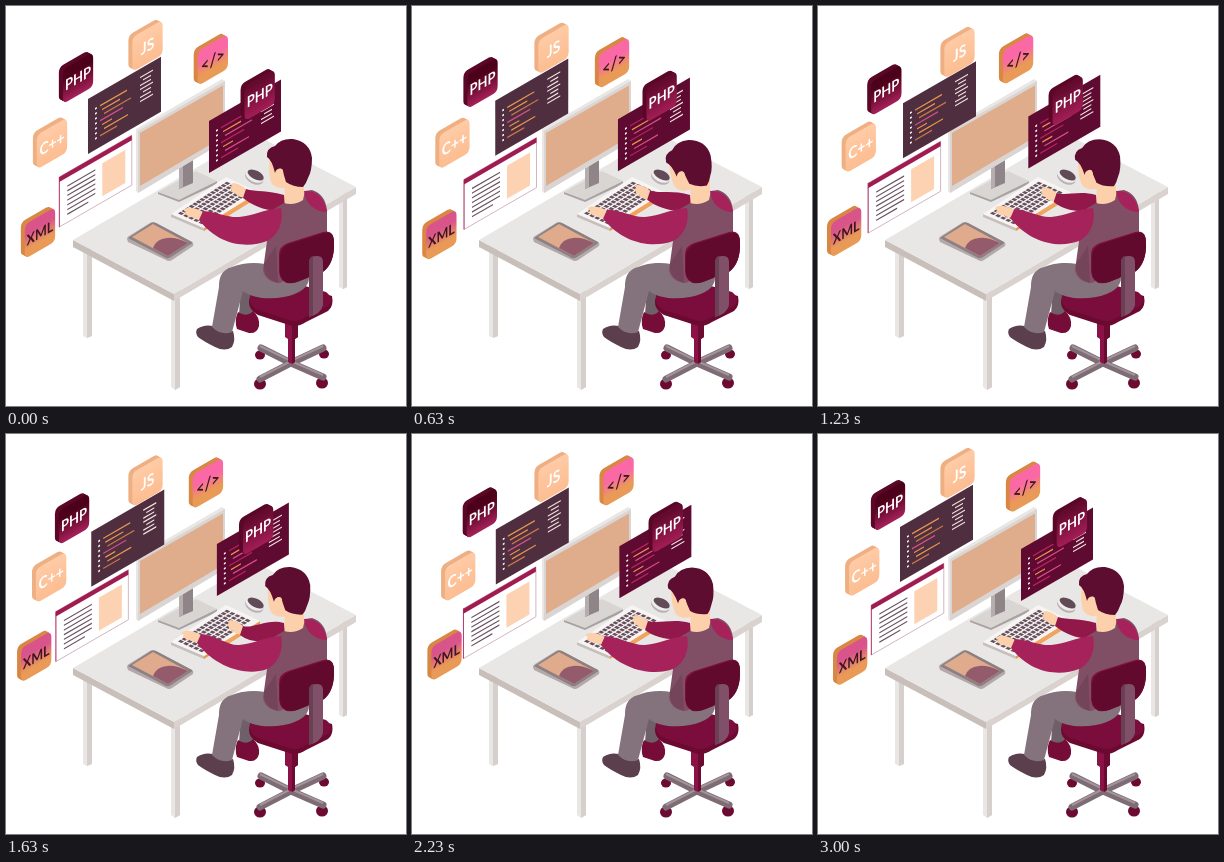
Recreate the animation shown at these times as an HTML page. Size 400 by 400 pixels, loop 3.03 s.

```html
<!DOCTYPE html>
<html lang="en">
<head>
<meta charset="utf-8">
<title>Developer at a desk</title>
<style>
html, body { margin: 0; width: 100%; height: 100%; overflow: hidden; background: #fff; }
svg { display: block; width: 100vw; height: 100vh; }
text { font-family: Lato, "Open Sans", sans-serif; font-weight: 700; text-anchor: middle; }
</style>
</head>
<body>
<svg id="stage" viewBox="0 0 400 400">
  <defs>
    <linearGradient id="wine" x2="0" y2="1"><stop offset=".25" stop-color="#4d0019"/><stop offset="1" stop-color="#a6215a"/></linearGradient>
    <linearGradient id="berry" x2="0" y2="1"><stop offset=".1" stop-color="#640a2f"/><stop offset="1" stop-color="#a31d55"/></linearGradient>
    <linearGradient id="sunset" x2="0" y2="1"><stop offset=".3" stop-color="#d9548b"/><stop offset=".75" stop-color="#e99a56"/></linearGradient>
    <linearGradient id="candy" x2="0" y2="1"><stop offset=".35" stop-color="#fb68a6"/><stop offset=".75" stop-color="#e99a56"/></linearGradient>
    <linearGradient id="peach" x2="0" y2="1"><stop offset="0" stop-color="#ffcba6"/><stop offset="1" stop-color="#fcbd91"/></linearGradient>
  </defs>

  <g id="desk">
    <path fill="#e9e7e6" d="M333 185h8v96l-4 2-4-2zM77 236h9v94l-5 2-4-2zM165 284h9v97l-5 3-4-3z"/>
    <path fill="#d6cfcb" d="M337 185h4v96l-4 2zM81 236h5v94l-5 2zM169 284h5v97l-5 3z"/>
    <path fill="#c9bfba" d="M67 234L168 288V295L67 241Z"/>
    <path fill="#d9d2ce" d="M168 288L350 181V188L168 295Z"/>
    <path fill="#e8e7e5" d="M67 234L248 128L350 181L168 288Z"/>
  </g>

  <g id="monitor">
    <path fill="#aaa2a2" d="M152 186L173 193L211 175V178L173 196L152 188Z"/>
    <path fill="#d9d5d3" d="M152 186L190 165L211 175L173 194Z"/>
    <path fill="#8f8588" d="M173 155l14-8v30l-14 6z"/>
    <path fill="#b5adae" d="M173 155l4-2v28l-4 2z"/>
    <path fill="#e9e6e4" d="M130 123L216 73L219 75V135L132 187L130 185Z"/>
    <path fill="#dad5d2" d="M132 125L219 75V135L132 187Z"/>
    <path fill="#dfac8c" d="M134 127L217 79.500V131L134 180Z"/>
  </g>

  <g id="tablet">
    <path fill="#b3a8aa" d="M121 233q0-2 2-3L144 217q3-2 6 0L186 236q2 1 1 4L166 254q-3 2-6 0L122 236z"/>
    <path fill="#8d8083" d="M122 232L145 217q2-1 5 0L186 236q1 1-1 2L165 251q-3 2-5 1z"/>
    <path fill="#dfab8c" d="M126 231L147 218L182 237L162 250Z"/>
    <path fill="#945b6d" d="M147 242Q150 233 161 232Q170 231 182 237L162 250Z"/>
  </g>

  <g id="keyboard">
    <path fill="#c7bfbc" d="M165 208L198 222V225L165 211Z"/>
    <path fill="#e8994f" d="M198 222L254 187V190L198 225Z"/>
    <path fill="#f7f5f4" d="M165 208L220 171L254 187L198 222Z"/>
    <g id="keys" fill="#68505d"></g>
    <path fill="#f0a45f" d="M203 217L240 194L244 196L207 219Z"/>
  </g>

  <g id="mouse" transform="rotate(27 248 170)">
    <ellipse cx="249" cy="171.500" rx="9.800" ry="6" fill="#b9b1b3"/>
    <ellipse cx="248.500" cy="169.800" rx="9.800" ry="5.700" fill="#efecec"/>
    <ellipse cx="249" cy="168.300" rx="8.800" ry="4.300" fill="#604b57"/>
  </g>

  <g id="windows"></g>
  <g id="tiles"></g>

  <g id="chair-base">
    <g fill="#6d0a32">
      <ellipse cx="254" cy="378" rx="6" ry="5.500"/><ellipse cx="316" cy="377" rx="6" ry="5.500"/>
      <ellipse cx="254" cy="349" rx="5" ry="4.500"/><ellipse cx="318" cy="348" rx="5" ry="4.500"/>
    </g>
    <g stroke="#7e6c75" stroke-width="7" stroke-linecap="round">
      <path d="M285 357L255 342M285 357L317 342M285 357L254 373M285 357L317 371"/>
    </g>
    <path stroke="#a3939b" stroke-width="2" fill="none" d="M254 340L285 355L317 340M254 371L285 355L317 369"/>
    <path fill="#8a1246" d="M279 314h13v17l-3 2v23q-3 3-7 0v-23l-3-2z"/>
    <path fill="#6d0a32" d="M286 314h6v17l-3 2v23l-3 2z"/>
  </g>

  <g id="lower-body">
    <path fill="#6f5f68" d="M235 280L233 309Q240 315 246 311L254 288Z"/>
    <path fill="#760d39" d="M232 306Q241 312 247 305Q254 311 253 320Q251 328 243 327L231 323Q228 314 232 306Z"/>
    <path fill="#6b0931" d="M244 291Q240 302 252 309L283 319Q291 322 300 316L322 305Q328 300 326 290L290 280Z"/>
    <path fill="#7a0d3b" d="M244 289Q242 300 252 304L283 314Q291 317 300 311L322 300Q329 293 320 286L285 276Z"/>
    <path fill="#5b3f4c" d="M191 323Q198 318 207 320Q218 328 227 325Q230 334 226 341Q219 346 209 341Q197 335 192 331Q189 327 191 323Z"/>
    <path fill="#84737c" d="M259 258C248 256 236 257 226 261C215 264 213 272 213 281L206 321Q215 330 226 326L237 285C246 292 262 294 278 291C294 288 303 281 303 272L275 265Z"/>
  </g>

  <path id="neck" fill="#fbd0aa" d="M279 172L278 204H298V172Z"/>
  <g id="head">
    <path fill="#fbd0aa" d="M264 152Q262 166 265 176Q269 183 278 182Q288 184 297 178L285 145Z"/>
    <path fill="#5d0d2f" d="M261 151Q260 142 269 140Q275 132 287 133Q304 136 306 152Q306 165 302 172Q300 178 297 181Q287 181 280 176L277 166Q277 162 273 163Q270 163 269 167Q266 154 261 151Z"/>
    <ellipse cx="274" cy="167" rx="3.300" ry="4.600" fill="#fbd0aa"/>
  </g>

  <path id="far-hand" fill="#fbd0aa" d="M240 183Q234 178 228 177Q223 178 226 180Q223 182 226 184Q225 187 229 187Q232 192 239 191Z"/>
  <path id="far-sleeve" fill="#93184a"/>
  <path fill="#814f65" d="M268 203L278 197Q288 200 297 194L299 185L306 184Q319 188 321 204V252L274 277Q259 276 257 264L262 228Z"/>
  <path fill="#a6225a" d="M298 185Q317 184 321 206Q312 206 305 200Q299 194 298 185Z"/>
  <path fill="#73445a" d="M258 258L270 240L272 277Q257 273 258 258Z"/>
  <path id="near-hand" fill="#fbd0aa" d="M197 206Q188 201 181 202Q175 204 180 206Q177 208 181 209Q182 212 186 211Q190 214 195 214Z"/>
  <path id="near-sleeve" fill="#a6225a"/>

  <g id="chair-back">
    <path fill="#7d0f3f" d="M273 249Q273 240 282 237L317 226Q328 223 328 236Q329 257 317 266L291 276Q275 281 273 266Z"/>
    <path fill="#620a2e" d="M274 251Q274 242 283 238L318 227Q329 224 328 238Q328 257 318 265L291 276Q276 280 274 267Z"/>
    <path fill="#805068" d="M303 257Q303 250 310 250Q317 249 317 256V299Q315 308 303 311Z"/>
    <path fill="#6a4055" d="M303 257Q303 251 307 250V309L303 311Z"/>
  </g>
</svg>

<script>
const LOOP = 3030;
const byId = id => document.getElementById(id);
const rect = (x, y, w, h, fill) =>
  `<rect x="${x}" y="${y}" width="${w}" height="${h}" fill="${fill}"/>`;

// Keyboard keys sit on a skewed grid.
let keys = "";
for (let row = 0; row < 5; row++) {
  for (let col = 0; col < 14; col++) {
    const x = 172 + col * 3.55 + row * 5.1;
    const y = 207.5 - col * 2.32 + row * 2.3;
    keys += `<path d="M${x} ${y}l2.500-1.700 3.600 1.600-2.500 1.700z"/>`;
  }
}
byId("keys").innerHTML = keys;

function codeLines(colors) {
  const lengths = [27, 20, 31, 23, 12, 28, 17];
  let out = "";
  lengths.forEach((w, i) => {
    const y = 13 + i * 5;
    out += rect(7, y, 1.8, 1.8, "#fff");
    out += rect(12 + (i % 3) * 2, y, w - (i % 3) * 2, 1.4, colors[i % colors.length]);
  });
  for (let i = 0; i < 7; i++) {
    out += rect(52 + (i % 3 === 1 ? 3 : 0), 8 + i * 4, [13, 8, 11][i % 3], 1.3, "#f3e4e4");
  }
  return out;
}

function pageLines() {
  let out = "";
  for (let i = 0; i < 7; i++) out += rect(8, 13 + i * 4.7, i === 6 ? 21 : 28, 1.3, "#69505f");
  return out + rect(43, 11, 23, 33, "#fdd2b3");
}

// Each window drifts from x,y by dx,dy and back once per loop.
const windows = [
  { x: 82, y: 93, dx: 3.3, dy: 4.7,
    art: rect(0, 0, 73, 55, "#4f2e3f") + codeLines(["#e9994f", "#e9994f", "#c97a4c", "#d94f8b"]) },
  { x: 53.3, y: 171, dx: -3.5, dy: 6.7,
    art: `<rect width="72.500" height="50" fill="#fff" stroke="#c9a3b3" stroke-width=".7"/>` +
      rect(-0.4, 0, 0.9, 50, "#b8316a") + rect(0, 0, 72.5, 5, "#a01c50") + pageLines() },
  { x: 203, y: 115, dx: 8, dy: -5,
    art: rect(0, 0, 72, 52, "#5f0a31") + codeLines(["#b8245f", "#e9994f", "#d94f8b"]) }
];

// wave: [middle, amplitude, phase in degrees] for the tile centre.
const tiles = [
  { label: "PHP", size: 15, ink: "#fff", face: "wine", side: "#5b0727",
    x: [69.5, 2, 0], y: [78.2, 6.7, 180] },
  { label: "JS", size: 16, ink: "#fff", face: "peach", side: "#eeb083",
    x: [141, 0, 0], y: [43.2, 3.8, 180] },
  { label: "C++", size: 16, ink: "#fff", face: "peach", side: "#eeb083",
    x: [44.7, 3.2, 285], y: [139.8, 3.4, 215] },
  { label: "XML", size: 14.5, ink: "#3f1426", face: "sunset", side: "#d98744",
    x: [31.2, 3.8, 307], y: [224.8, 4, 65] },
  { label: "&lt;/&gt;", size: 17, ink: "#3f1426", face: "candy", side: "#d98744",
    x: [203.5, 4, 315], y: [51.7, 5, 70] },
  { label: "PHP", size: 15, ink: "#fff", face: "berry", side: "#5b0727",
    x: [252, 3.5, 290], y: [92, 3.5, 195] }
];

function addGroup(parent, html) {
  const g = document.createElementNS("http://www.w3.org/2000/svg", "g");
  g.innerHTML = html;
  byId(parent).append(g);
  return g;
}

for (const w of windows) w.el = addGroup("windows", `<g transform="skewY(-30)">${w.art}</g>`);

// Tiles share one isometric projection: cos 30 across, sin 30 up.
for (const t of tiles) {
  const block = (x, y, fill) =>
    `<rect x="${x - 17.5}" y="${y - 17.3}" width="35" height="34.600" rx="5.500" fill="${fill}"/>`;
  let depth = "";
  for (let i = 4; i > 0; i--) depth += block(-i * 1.15, -i * 1.1, t.side);
  t.el = addGroup("tiles", `<g transform="matrix(.866 -.5 0 1 .5 .5)">${depth}` +
    block(0, 0, `url(#${t.face})`) +
    `<text y="${t.size * 0.36}" font-size="${t.size}" fill="${t.ink}">${t.label}</text></g>`);
}

// Pose table: time, head tilt, near hand x/y, far hand x/y.
const poses = [
  [0, 0, 0, 0, 0, 0],
  [370, -7, -4, -3, -4, 4],
  [870, -13, 0, 0, 0, 0],
  [1450, -2, -1, -3, -2, 6],
  [1630, -2.5, -2, -5, -3, 9],
  [2230, -7, -4, -3, -4, 4],
  [2630, -13, 0, 0, -2, 3],
  [3000, 0, 0, 0, 0, 0],
  [LOOP, 0, 0, 0, 0, 0]
];

function poseAt(time) {
  const i = poses.findIndex(p => p[0] > time);
  const a = poses[i - 1], b = poses[i];
  const u = (time - a[0]) / (b[0] - a[0]);
  const k = u * u * (3 - 2 * u);
  return a.slice(1).map((v, n) => v + (b[n + 1] - v) * k);
}

const place = (el, x, y) => el.setAttribute("transform", `translate(${x} ${y})`);

function draw(time) {
  const angle = time / LOOP * 2 * Math.PI;
  const drift = (1 - Math.cos(angle)) / 2;
  const wave = ([mid, amp, phase]) => mid + amp * Math.cos(angle - phase * Math.PI / 180);

  for (const w of windows) place(w.el, w.x + w.dx * drift, w.y + w.dy * drift);
  for (const t of tiles) place(t.el, wave(t.x), wave(t.y));

  const [tilt, nx, ny, fx, fy] = poseAt(time);
  byId("head").setAttribute("transform", `rotate(${tilt} 288 192)`);
  place(byId("near-hand"), nx, ny);
  place(byId("far-hand"), fx, fy);
  byId("near-sleeve").setAttribute("d",
    `M${197 + nx} ${205 + ny}C${211 + nx} ${206 + ny} 223 212 233 211C248 210 258 203 275 202` +
    `C278 216 272 230 261 235C243 242 ${214 + nx} ${241 + ny} ${193 + nx} ${214 + ny}Z`);
  byId("far-sleeve").setAttribute("d",
    `M${240 + fx} ${183 + fy}C${250 + fx} ${186 + fy} 262 184 278 189L279 203` +
    `C265 207 ${250 + fx} ${202 + fy} ${237 + fx} ${192 + fy}Z`);
}

const start = performance.now();
function tick() {
  draw((performance.now() - start) % LOOP);
  requestAnimationFrame(tick);
}
tick();
</script>
</body>
</html>
```
